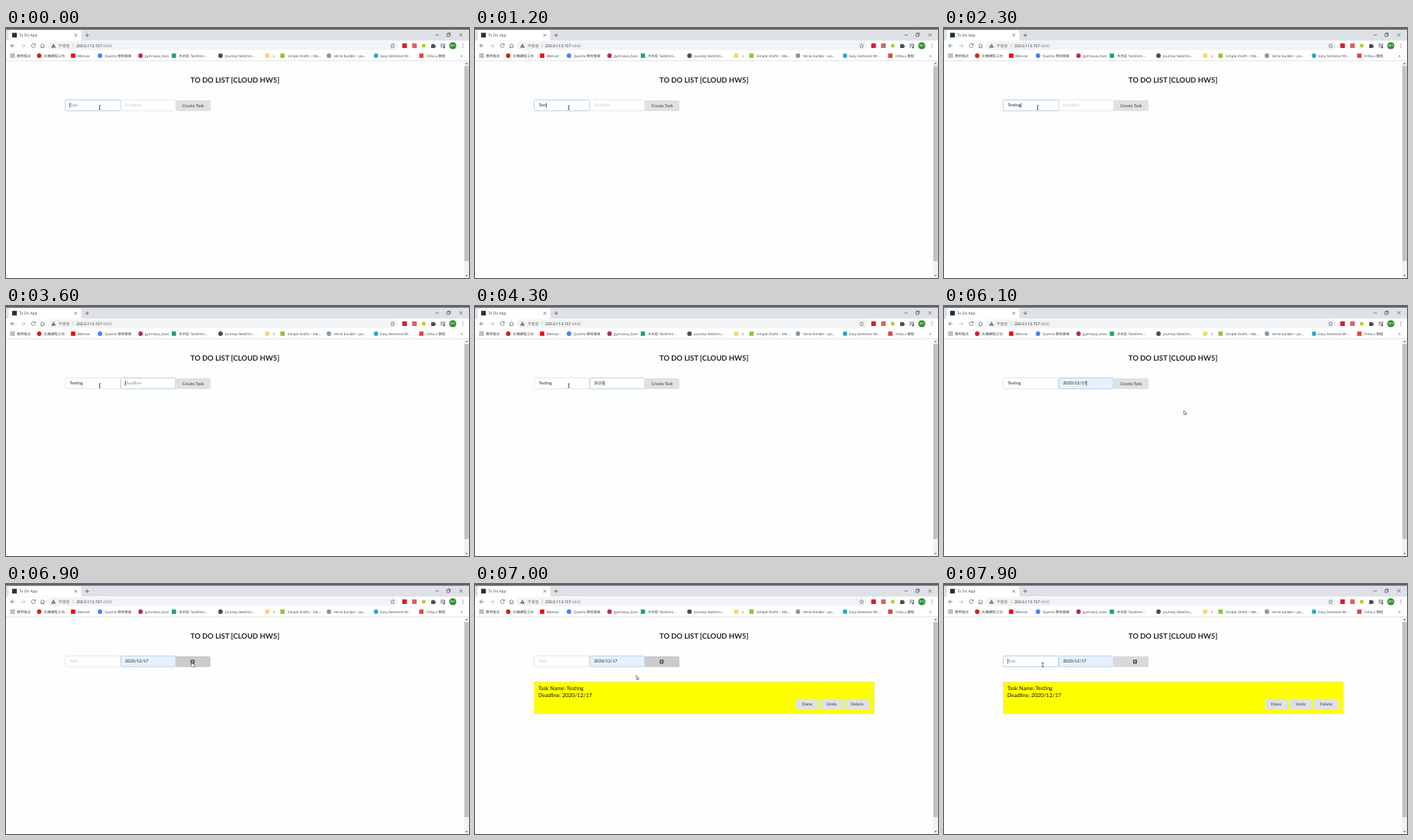
An HTML page for the animation above (8 s loop, 600 px wide and 325 px high).

```html
<!DOCTYPE html>
<html>
<head>
<meta charset="utf-8">
<title>To Do App</title>
<style>
html, body { margin: 0; width: 100%; height: 100%; overflow: hidden; background: #fefefe; }
svg { display: block; width: 600px; height: 325px; text-rendering: geometricPrecision; }
.ui { font: 4.5px "Open Sans", "Noto Sans CJK TC", "Noto Sans CJK", sans-serif; fill: #3c4043; }
.page { font: 5.47px Lato, sans-serif; fill: #212121; }
.line { fill: none; stroke: #5f6368; stroke-width: .8; }
.btn { font-weight: 700; fill: #626263; text-anchor: middle; }
.box { fill: #fff; stroke: #dededf; stroke-width: .7; }
</style>
</head>
<body>
<svg viewBox="0 0 600 325">
  <defs><clipPath id="clip"><rect x="220" y="94" width="45" height="14" rx="1.6"/></clipPath></defs>
  <rect width="600" height="325" fill="#fefefe"/>

  <!-- tab strip -->
  <rect width="600" height="17" fill="#dee1e6"/>
  <rect width="600" height="2.2" fill="#65636b"/>
  <path d="M1 16.5Q3.5 16.5 3.5 14V5.5Q3.5 3 6 3H95Q97.500 3 97.500 5.500V14Q97.500 16.500 100 16.500Z" fill="#fff"/>
  <rect x="8" y="6.300" width="6" height="6" fill="#1d3439"/>
  <text class="ui" x="17" y="11.300" style="font-size:4.900px">To Do App</text>
  <path class="line" d="M88.800 7.700l3.400 3.400m0-3.400l-3.400 3.400M102.700 9.400h5m-2.500-2.500v5"/>
  <path class="line" stroke-width=".6" d="M556.500 9h4.600M571.300 7.700h3.400v3.400h-3.400zM572.400 7.500v-1h3.400v3.400h-1M587.400 6.800l4.200 4.200m0-4.200l-4.200 4.200"/>

  <!-- toolbar -->
  <rect y="16.400" width="600" height="26.200" fill="#fff"/>
  <rect y="42.400" width="600" height=".7" fill="#d9dadc"/>
  <path class="line" d="M11.200 23H6.200m2.400-2.500L6.100 23l2.500 2.500"/>
  <path class="line" style="stroke:#b8babd" d="M19.500 23h5m-2.400-2.500l2.500 2.500-2.500 2.500"/>
  <path class="line" d="M37.500 21.400a2.500 2.500 0 1 0 .4 2.300M38 20v2h-2"/>
  <path class="line" d="M44.700 23l2.600-2.600 2.600 2.600M45.500 22.600v3h3.600v-3"/>
  <rect x="54" y="17.600" width="454" height="10.800" rx="5.400" fill="#f1f3f4"/>
  <path d="M61.500 20.300l3 5.200h-6z" fill="#5f6368"/>
  <path d="M61.500 22v1.500m0 .5v.6" stroke="#fff" stroke-width=".6"/>
  <text class="ui" x="68" y="24.800" style="font-size:4.900px;fill:#5f6368">不安全</text>
  <path d="M87 20.500v5" stroke="#a5a8ab" stroke-width=".5"/>
  <text class="ui" x="91" y="24.800" style="font-size:5.100px;fill:#202124">203.0.113.157<tspan fill="#80868b">:4800</tspan></text>
  <path class="line" style="stroke-width:.6" d="M501 20.200l.8 1.900 2 .2-1.500 1.400.4 2-1.700-1-1.700 1 .4-2-1.500-1.400 2-.2z"/>
  <rect x="513.500" y="20" width="6" height="6" fill="#d3202d"/>
  <rect x="526.300" y="20" width="6" height="6" fill="#d8645f"/>
  <circle cx="541.300" cy="23" r="2.500" fill="#b5cc35"/>
  <path d="M551 21.300h1.600a.9.900 0 1 1 1.800 0h1.500v1.600a.9.900 0 1 1 0 1.700v1.500H551z" fill="#4a4d51"/>
  <path class="line" d="M563 21h5m-5 1.900h5m-5 1.900h2.600"/>
  <path d="M568.500 20.500v4.500" class="line"/><circle cx="567.600" cy="25.200" r="1.200" fill="#5f6368"/>
  <circle cx="579" cy="23" r="4.600" fill="#2f8d2b"/>
  <text class="ui" x="579" y="24.400" text-anchor="middle" style="font-size:3.500px;fill:#fff">用戶</text>
  <g fill="#5f6368"><circle cx="592" cy="20.900" r=".6"/><circle cx="592" cy="23" r=".6"/><circle cx="592" cy="25.100" r=".6"/></g>
  <g id="marks" class="ui"></g>
  <text class="ui" x="589" y="37.600" style="font-size:5.500px">»</text>

  <!-- scrollbar -->
  <rect x="593.500" y="43.100" width="6.500" height="282" fill="#f1f1f1"/>
  <rect x="594" y="49.500" width="5.600" height="253.500" fill="#c1c1c1"/>
  <path d="M595.300 47l1.600-1.800 1.600 1.800zM595.300 321.200l1.600 1.800 1.600-1.800z" fill="#5a5a5a"/>

  <!-- page -->
  <g class="page">
    <text x="296.700" y="70.900" text-anchor="middle" style="font-size:9.375px;font-weight:700">TO DO LIST [CLOUD HW5]</text>
    <rect id="taskBox" class="box" x="76.800" y="93.500" width="71.600" height="14.200" rx="1.600"/>
    <rect id="dateBox" class="box" x="148.800" y="93.500" width="71" height="14.200" rx="1.600"/>
    <text id="task" x="82.500" y="102.300"></text>
    <text id="date" x="154.200" y="102.300"></text>
    <rect id="caret" y="97.400" width=".6" height="6.200" fill="#111"/>
    <g clip-path="url(#clip)">
      <rect id="create" x="220" y="94" width="45" height="14"/>
      <text id="label" class="btn" x="242.500" y="102.800">Create Task</text>
      <g id="icon">
        <rect x="239.400" y="98.500" width="4.900" height="4.900" rx=".6" fill="#404041"/>
        <path d="M240.300 100.950h3.100m-1.550-1.550v3.100" stroke="#e4e4e5" stroke-width=".8"/>
      </g>
    </g>
    <g id="card">
      <rect x="76.700" y="127.200" width="440.600" height="41.400" fill="#ff0" stroke="#dcdcc0" stroke-width=".5"/>
      <g style="font-size:7.030px" fill="#111">
        <text x="82" y="138">Task Name: Testing</text>
        <text x="82" y="147">Deadline: 2020/12/17</text>
      </g>
      <g id="actions"></g>
    </g>
  </g>

  <g id="mouse">
    <path id="ibeam" d="M-1.300-2.700Q0-2.700 0-2V2Q0 2.700-1.300 2.700M1.300-2.700Q0-2.700 0-2M0 2Q0 2.700 1.300 2.700" fill="none" stroke="#222" stroke-width=".7"/>
    <path id="arrow" d="M0 0V5.300L1.200 4.200 2 6l.9-.4L2.100 3.900H3.700Z" fill="#fff" stroke="#222" stroke-width=".5"/>
    <path id="hand" d="M-.7.400Q0-.500.600.400V2.400L3.100 3Q3.700 3.200 3.600 4L3 6.400H-.300L-2.100 3.900Q-1.800 3-.7 3.900Z" fill="#fff" stroke="#222" stroke-width=".5"/>
  </g>
</svg>
<script>
const LOOP = 8000;
const $ = id => document.getElementById(id);

// icon x, colour, shape, text x, label
const bookmarks = [
  [8.5, "", "grid", 14, "應用程式"],
  [43, "#c8232c", "dot", 49, "北橋課程工坊"],
  [87, "#f00b0b", "box", 93, "Blenvor"],
  [121.8, "#4285f4", "dot", 128, "Quenlo 學術搜尋"],
  [174.3, "#b5304a", "dot", 180, "gymnova_class"],
  [217.6, "#1fa463", "box", 224, "木木匠 TaskFern..."],
  [278, "#4a4d51", "dot", 284, "Journey Sketchin..."],
  [338.5, "#f8d775", "box", 346, "z"],
  [358.3, "#8bc53f", "box", 365, "Simple Drafts – Mo..."],
  [418.5, "#8397ad", "dot", 425, "Verse builder – po..."],
  [479.5, "#2fa9c4", "dot", 485, "Easy Sentence Wr..."],
  [538.2, "#e0443e", "box", 545, "Orba.x 教程"]
];
const shapes = {
  dot: (x, c) => `<circle cx="${x}" cy="36" r="2.900" fill="${c}"/>`,
  box: (x, c) => `<rect x="${x - 2.8}" y="33.200" width="5.600" height="5.600" fill="${c}"/>`,
  grid: x => [..."012345678"].map(i =>
    `<rect x="${x - 2.7 + i % 3 * 2}" y="${33.3 + Math.floor(i / 3) * 2}" width="1.400" height="1.400" fill="${["#e0453a", "#4285f4", "#34a853"][Math.floor(i / 3)]}"/>`).join("")
};
$("marks").innerHTML = bookmarks.map(([x, c, shape, tx, label]) =>
  shapes[shape](x, c) + `<text x="${tx}" y="37.700">${label}</text>`).join("");

$("actions").innerHTML = [[416, 29, "Done"], [447.6, 29, "Undo"], [479, 32.4, "Delete"]].map(([x, w, s]) =>
  `<rect x="${x}" y="149.300" width="${w}" height="14" rx="1.600" fill="#e0e1e2"/>
   <text class="btn" x="${x + w / 2}" y="158.200">${s}</text>`).join("");

const taskKeys = [500, 700, 900, 1200, 1500, 1700, 1900];
const dateKeys = [3900, 4000, 4200, 4300];
const TO_DATE = 3500, FILL = 4700, HOVER = 6250, TO_BUTTON = 6450, SENT = 6850, ADDED = 6980, TO_TASK = 7865;
const caretResets = [-400, ...taskKeys, TO_DATE, ...dateKeys, FILL, 5100, TO_TASK];

// time, x, y of the pointer's hot spot
const path = [
  [0, 121.5, 103.5], [5500, 121.5, 103.5], [5700, 160, 118], [5900, 250, 133], [6000, 298, 137],
  [6100, 311, 136], [6200, 288, 121], [6300, 256, 106], [6400, 241.5, 101.3], [6900, 241.5, 101.3],
  [7000, 209.2, 118.8], [7100, 185, 119], [7200, 160, 114], [7350, 137, 107], [7500, 128, 105], [LOOP, 128, 105]
];

const passed = (keys, t) => keys.filter(k => k <= t).length;
const mix = (a, b, p) => a + (b - a) * p;

// CSS "ease", cubic-bezier(.25, .1, .25, 1)
function ease(p) {
  if (p <= 0) return 0;
  if (p >= 1) return 1;
  let lo = 0, hi = 1, u;
  for (let i = 0; i < 20; i++) {
    u = (lo + hi) / 2;
    if (.75 * u * (1 - u) + u ** 3 < p) lo = u; else hi = u;
  }
  return .3 * u * (1 - u) ** 2 + 3 * u * u * (1 - u) + u ** 3;
}

function show(id, on) { $(id).setAttribute("visibility", on ? "visible" : "hidden"); }

function field(id, value, hint, focused) {
  const el = $(id), s = value || hint;
  if (el.textContent !== s) el.textContent = s;
  el.setAttribute("fill", value ? "#212121" : focused ? "#8a8a8a" : "#c8c8c8");
}

function drawFields(t) {
  const focus = t < TO_DATE || t >= TO_TASK ? "task" : t < TO_BUTTON ? "date" : "";
  const values = {
    task: t < SENT ? "Testing".slice(0, passed(taskKeys, t)) : "",
    date: "2020/12/17".slice(0, t < FILL ? passed(dateKeys, t) : 10)
  };
  field("task", values.task, "Task", focus === "task");
  field("date", values.date, "Deadline", focus === "date");
  $("taskBox").style.stroke = focus === "task" ? "#96c3dd" : "#dededf";
  $("dateBox").style.stroke = focus === "date" ? "#96c3dd" : t >= FILL ? "#b5cbe3" : "#dededf";
  $("dateBox").style.fill = t >= FILL ? "#e8f0fe" : "#fff";

  const since = t - caretResets[passed(caretResets, t) - 1];
  show("caret", focus && Math.floor(since / 500) % 2 === 0);
  if (focus) {
    const el = $(focus);
    const w = values[focus] ? el.getComputedTextLength() : 0;
    $("caret").setAttribute("x", +el.getAttribute("x") + w);
  }
}

function drawButton(t) {
  const phase = ms => ease((t - HOVER) / ms) - ease((t - TO_TASK) / ms);
  const slide = phase(300), tint = phase(100);
  $("label").setAttribute("transform", `translate(${-90 * slide})`);
  $("icon").setAttribute("transform", `translate(${45 * (1 - slide)})`);
  $("create").setAttribute("fill", `rgb(${mix(224, 202, tint)},${mix(225, 203, tint)},${mix(226, 205, tint)})`);
}

function drawMouse(t) {
  const i = path.findIndex(p => p[0] > t);
  const [a, b] = [path[i - 1], path[i]];
  const p = (t - a[0]) / (b[0] - a[0]);
  const x = mix(a[1], b[1], p), y = mix(a[2], b[2], p);
  const inRow = y > 93 && y < 108 && x > 76 && x < 265;
  const kind = !inRow ? "arrow" : x < 220 ? "ibeam" : "hand";
  for (const id of ["ibeam", "arrow", "hand"]) show(id, id === kind);
  $("mouse").setAttribute("transform", `translate(${x} ${y})`);
}

const start = performance.now();
function tick() {
  const t = (performance.now() - start) % LOOP;
  drawFields(t);
  drawButton(t);
  drawMouse(t);
  $("card").style.display = t >= ADDED ? "" : "none";
  requestAnimationFrame(tick);
}
tick();
</script>
</body>
</html>
```
